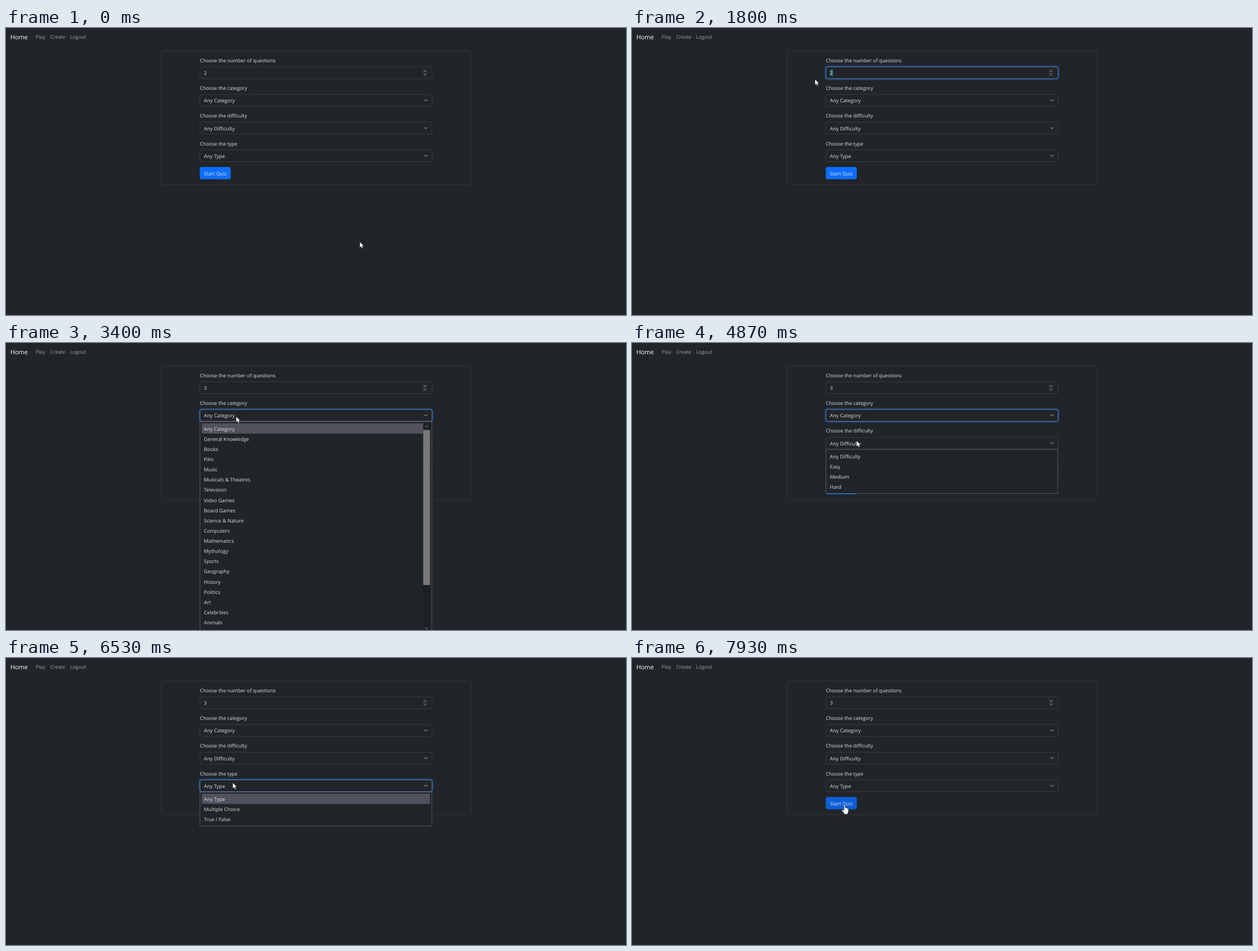
An HTML page for the animation above (8 s loop, 1098 by 510 pixels).

```html
<!DOCTYPE html>
<html lang="en">
<head>
<meta charset="utf-8">
<title>Quiz setup</title>
<style>
  html, body { margin: 0; width: 100%; height: 100%; overflow: hidden; background: #212529; }
  svg { display: block; width: 1098px; height: 510px; }
  text { font: 15.3px "Open Sans", "Noto Sans", sans-serif; fill: #dee2e6; text-rendering: geometricPrecision; white-space: pre; }
  .brand { font-size: 19.1px; fill: #fff; }
  .nav { fill: #a0a4a8; }
  .line { fill: none; stroke: #495057; }
  .chevron { fill: none; stroke: #dee2e6; stroke-width: 1.5; stroke-linecap: round; stroke-linejoin: round; }
  .spin { stroke: #b4b7ba; stroke-width: 1.4; }
  .popup { fill: #212529; stroke: #7a7e82; }
  .cursor { fill: #fff; stroke: #111; stroke-width: 1; stroke-linejoin: round; }
</style>
</head>
<body>
<svg><g id="page" transform="scale(.571875)"></g></svg>
<script>
const SCALE = 0.571875, TICK = 1000 / 15, LOOP = 8000;
const ROW = 31.7;

const categories = ["Any Category", "General Knowledge", "Books", "Film", "Music", "Musicals & Theatres",
  "Television", "Video Games", "Board Games", "Science & Nature", "Computers", "Mathematics", "Mythology",
  "Sports", "Geography", "History", "Politics", "Art", "Celebrities", "Animals"];

// focus: ticks [fade-in start, end, fade-out start, end]; open: ticks [shown, highlighted, hidden]
const fields = [
  { label: "number of questions", focus: [16, 18, 34, 36] },
  { label: "category", options: categories, focus: [49, 51, 73, 74], open: [49, 51, 61], scroll: true },
  { label: "difficulty", options: ["Any Difficulty", "Easy", "Medium", "Hard"], focus: [73, 74, 96, 98], open: [73, 74, 86] },
  { label: "type", options: ["Any Type", "Multiple Choice", "True / False"], focus: [96, 98, 115, 118], open: [96, 98, 107] },
];

// Pointer path: tick, x, y in stage pixels
const path = [
  [2, 626.5, 380], [10, 267, 100], [12, 298, 72], [15, 358, 79], [16, 358, 79], [20, 329, 79],
  [21, 329, 79], [24, 321.5, 91], [26, 321.5, 91], [27, 324, 91], [29, 333, 89.5], [30, 333, 89.5],
  [35, 302, 110], [36, 302, 110], [41, 404.5, 135.5], [43, 405, 136], [45, 407.5, 130.5],
  [64, 407.5, 130.5], [70, 397.5, 173.5], [87, 397.5, 173.5], [93, 401.5, 221.5],
  [108, 401.5, 221.5], [116, 378, 261], [119, 376.5, 262],
];

const text = (x, y, s, cls = "", size = "") =>
  `<text x="${x}" y="${y}" class="${cls}" ${size && `style="font-size:${size}px"`}>${s.replace("&", "&amp;")}</text>`;
const box = (x, y, w, h, r, attrs) => `<rect x="${x}" y="${y}" width="${w}" height="${h}" rx="${r}" ${attrs}/>`;
const chevron = (x, y, w, h, cls = "") =>
  `<path class="chevron ${cls}" d="M${x - w} ${y - h}L${x} ${y + h}L${x + w} ${y - h}"/>`;

function fieldMarkup(f, i) {
  const top = 120 + 86 * i;
  const spinner = box(1290, top + 7, 15, 24, 3, 'fill="#2b2f33"') +
    chevron(1297.5, top + 14, 3, -1.6, "spin") + chevron(1297.5, top + 24, 3, 1.6, "spin");
  const value = f.options
    ? text(613, top + 25.6, f.options[0], "", 15.5) + chevron(1300, top + 19, 4.5, 2.25)
    : box(613, top + 9, 9.5, 20, 0, 'id="selection" fill="#23606d"') +
      `<text id="count" x="613" y="${top + 25.6}"></text>` + spinner;
  return text(600.5, top - 13.4, "Choose the " + f.label) +
    box(600.5, top + .5, 719, 37, 6, 'class="line"') +
    `<g id="focus${i}">` +
    box(598, top - 2, 724, 42, 8, 'fill="none" stroke="#0d6efd" stroke-opacity=".3" stroke-width="4"') +
    box(600.5, top + .5, 719, 37, 6, 'fill="none" stroke="#86b7fe"') + "</g>" + value;
}

function popupMarkup(f, i) {
  if (!f.options) return "";
  const top = 158 + 86 * i;
  const height = f.scroll ? 700 : f.options.length * ROW + 11;
  const right = f.scroll ? 1292 : 1313;
  const scrollbar = f.scroll
    ? box(1292, top + 5, 21, 690, 0, 'fill="#1c1f23"') + box(1292, 270, 21, 482, 0, 'fill="#787878"') +
      chevron(1302.5, 259, 4.5, -2.2, "spin") + chevron(1302.5, 887, 4.5, 2.2, "spin")
    : "";
  return `<g id="popup${i}">` + box(600.5, top + .5, 718, height - 1, 0, 'class="popup"') +
    box(606, top + 5.5, right - 606, 32, 0, `id="mark${i}" fill="#52515e"`) +
    f.options.map((s, k) => text(613, top + 28.2 + k * ROW, s, "", 15.4)).join("") + scrollbar + "</g>";
}

const $ = id => document.getElementById(id);
$("page").innerHTML =
  text(13.5, 35.8, "Home", "brand") +
  text(92, 34.1, "Play", "nav") + text(137, 34.1, "Create", "nav") + text(198.5, 34.1, "Logout", "nav") +
  box(480.5, 71.5, 960, 415, 6, 'class="line" style="stroke:#42464a"') +
  fields.map(fieldMarkup).join("") +
  box(600, 432, 96, 38, 6, 'id="button"') + text(613, 457.6, "Start Quiz", "", 15.4).replace("<text", '<text fill="#fff"') +
  fields.map(popupMarkup).join("") +
  `<g id="pointer">
    <path id="arrow" class="cursor" d="M0 0V18.5L4.3 14.5L7 21L10.2 19.7L7.5 13.3H13Z"/>
    <path id="beam" fill="none" stroke="#fff" stroke-width="1.4" d="M-4 -9H4M0 -9V9M-4 9H4"/>
    <path id="hand" class="cursor" d="M-2 1Q0 -2 2 1V8Q4 6 5.5 8.5Q8 7 9 9.5Q12 9 12 12V18Q12 22 9.5 24V27H-2V24L-8 16Q-9 12 -6 12.5L-2 16Z"/>
  </g>`;

const clamp = v => Math.min(1, Math.max(0, v));
const ramp = (n, a, b) => clamp((n - a) / (b - a));
const show = (id, on) => $(id).setAttribute("visibility", on ? "inherit" : "hidden");

function pointerAt(n) {
  const next = path.findIndex(p => p[0] >= n);
  if (next <= 0) return path[0].slice(1);
  const [a, x0, y0] = path[next - 1], [b, x1, y1] = path[next];
  const u = ramp(n, a, b), e = u * u * (3 - 2 * u);
  return [x0 + (x1 - x0) * e, y0 + (y1 - y0) * e];
}

function draw(ms) {
  const n = Math.floor((ms % LOOP + 5) / TICK);
  fields.forEach((f, i) => {
    const [a, b, c, d] = f.focus;
    $("focus" + i).setAttribute("opacity", ramp(n, a, b) - ramp(n, c, d));
    if (!f.open) return;
    const [shown, marked, hidden] = f.open;
    $("popup" + i).setAttribute("visibility", n >= shown && n < hidden ? "visible" : "hidden");
    show("mark" + i, n >= marked);
  });
  $("count").textContent = n < 32 ? "2" : "3";
  show("selection", n >= 18 && n < 32);

  const [x, y] = pointerAt(n);
  const hover = x > 343 && x < 398 && y > 247 && y < 269;
  const beam = n >= 14 && n <= 22;
  $("button").setAttribute("fill", hover ? "#0b5ed7" : "#0d6efd");
  $("pointer").setAttribute("transform", `translate(${x / SCALE} ${y / SCALE})`);
  show("arrow", !hover && !beam);
  show("beam", beam);
  show("hand", hover);
}

const start = performance.now();
function frame() {
  draw(performance.now() - start);
  requestAnimationFrame(frame);
}
frame();
</script>
</body>
</html>
```
